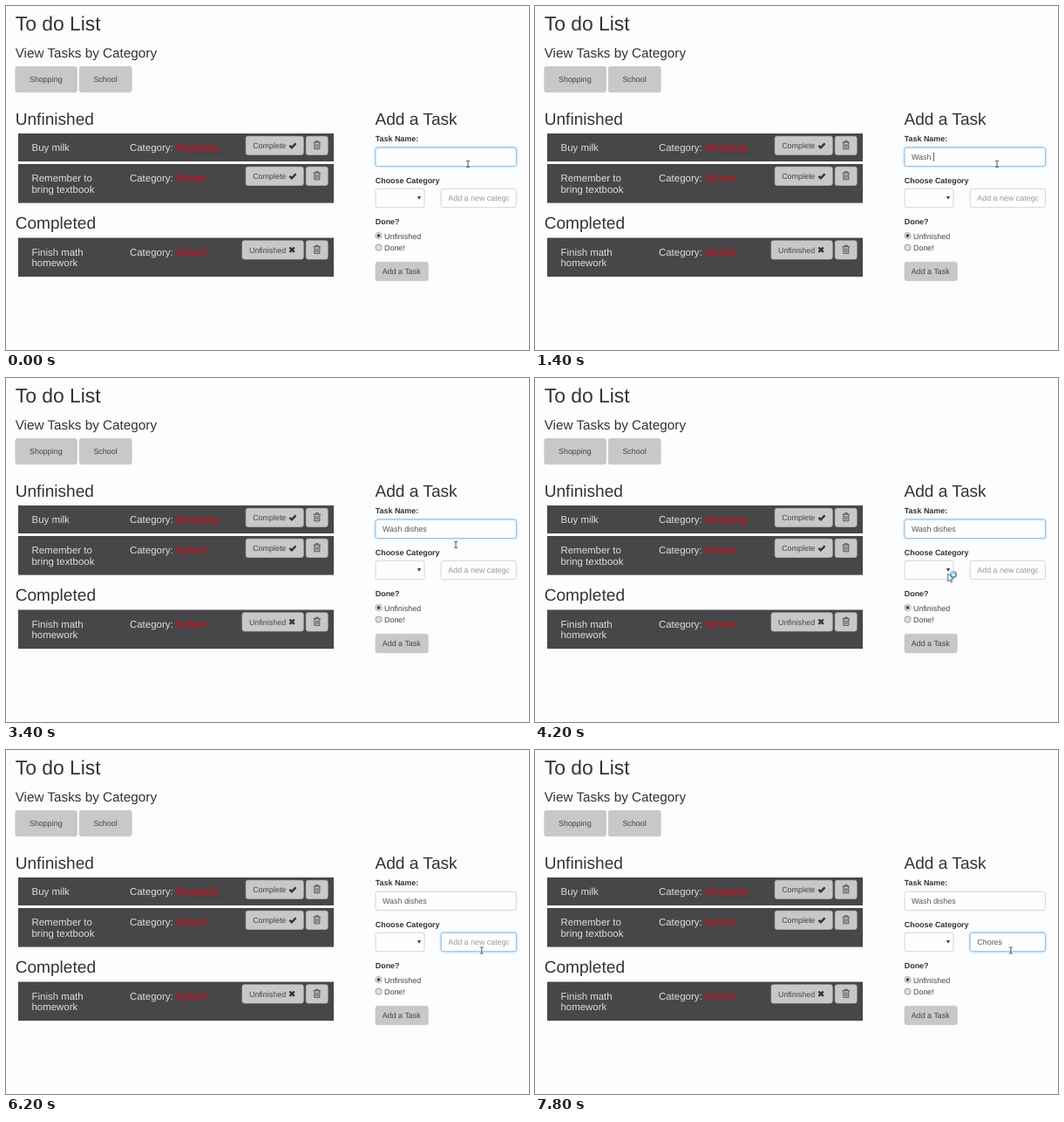
An HTML page for the animation above (8 s loop, 600 by 394 pixels).

```html
<!DOCTYPE html>
<html lang="en">
<head>
<meta charset="utf-8">
<title>To do List</title>
<style>
  html, body { margin: 0; width: 100%; height: 100%; overflow: hidden; background: #fdfcfe; }
  svg { display: block; width: 600px; height: 394px; }
  text { font: 8.91px "Liberation Sans", Arial, sans-serif; fill: #444; white-space: pre; text-rendering: geometricPrecision; }
  .h1 { font-size: 22.9px; fill: #333; }
  .h2 { font-size: 19.1px; fill: #333; }
  .h3 { font-size: 15.27px; fill: #333; }
  .label { font-weight: bold; fill: #333; }
  .item { font-size: 11.45px; fill: #dedddf; }
  .tag { font-size: 11.45px; fill: #dc0010; }
  .value { fill: #555; }
  .hint { fill: #999; }
  .card { fill: #474648; }
  .button { fill: #c8c7c9; stroke: #c1c0c2; stroke-width: .6; }
  .field { fill: #fefdff; stroke: #cbcacd; stroke-width: .8; }
  .field.focus { stroke: #72b3e6; filter: drop-shadow(0 0 1.6px rgba(102, 175, 233, .65)); }
</style>
</head>
<body>
<svg viewBox="0 0 600 394">
  <defs>
    <clipPath id="hintClip"><rect x="507" y="210" width="70.3" height="20"/></clipPath>
    <path id="check" d="M1.4 4.3 L3.8 6.7 L8.5 1.8" fill="none" stroke="#333" stroke-width="2.4"/>
    <path id="cross" d="M1.4 1.4 L6.8 6.8 M6.8 1.4 L1.4 6.8" fill="none" stroke="#333" stroke-width="2.4"/>
    <g id="trash" fill="none" stroke="#444" stroke-width=".9">
      <path d="M0 2 H8.4 M2.7 2 V.5 H5.7 V2 M1.2 2.2 V9.6 H7.2 V2.2 M3.2 3.8 V8.3 M5.2 3.8 V8.3"/>
    </g>
  </defs>
  <g id="page"></g>
  <rect id="caret" width=".8" height="10" fill="#333"/>
  <g id="pointer">
    <path id="beam" d="M-2 -3.7 Q0 -3.7 0 -2.7 Q0 -3.7 2 -3.7 M0 -3 V3 M-2 3.7 Q0 3.7 0 2.7 Q0 3.7 2 3.7" fill="none" stroke="#444" stroke-width=".9"/>
    <path id="arrow" d="M0 0 V8.9 L2 7 L3.4 10.2 L4.9 9.5 L3.5 6.5 L6.2 6.3 Z" fill="#fff" stroke="#444" stroke-width=".8"/>
    <g id="busy" transform="translate(6.3 1.2)" fill="none">
      <circle r="3.1" stroke="#5c9fcb" stroke-width="2.2"/>
      <path d="M-2.9 -1 A3.1 3.1 0 0 1 1 -2.9" stroke="#a5d3ec" stroke-width="1.6"/>
    </g>
  </g>
</svg>
<script>
const LOOP = 8000;
const $ = id => document.getElementById(id);
const page = $('page');

function add(tag, attrs, content = '') {
  const node = document.createElementNS('http://www.w3.org/2000/svg', tag);
  for (const key in attrs) node.setAttribute(key, attrs[key]);
  node.textContent = content;
  return page.appendChild(node);
}
const text = (x, y, content, cls = '') => add('text', { x, y, class: cls }, content);
const box = (x, y, width, height, cls, rx = 2.4) => add('rect', { x, y, width, height, rx, class: cls });
const icon = (name, x, y) => add('use', { href: '#' + name, x, y });

function button(x, y, width, height, label, pad) {
  box(x, y, width, height, 'button');
  text(x + pad, y + height / 2 + 3.1, label);
}

function card(y, height, lines, category, done) {
  box(14, y, 362, height, 'card', 0);
  lines.forEach((line, i) => text(29.5, y + 20 + i * 12.6, line, 'item'));
  text(142, y + 20, 'Category: ', 'item');
  text(194.8, y + 20, category, 'tag');
  const left = done ? 271 : 275.2;
  button(left, y + 3.3, 341.3 - left, 21.2, done ? 'Unfinished' : 'Complete', 8);
  icon(done ? 'cross' : 'check', 324, y + 9.6);
  box(344.2, y + 3.3, 25, 21.2, 'button');
  icon('trash', 352.6, y + 8.2);
}

function radio(y, label, checked) {
  add('circle', { cx: 427.5, cy: y, r: 3.6, fill: checked ? '#f5f5f6' : '#dddcde', stroke: '#8c8b8d', 'stroke-width': .8 });
  if (checked) add('circle', { cx: 427.5, cy: y, r: 1.9, fill: '#444' });
  text(434, y + 3.8, label);
}

text(10.7, 28.3, 'To do List', 'h1');
text(10.7, 59, 'View Tasks by Category', 'h3');
button(10.8, 69.3, 70.6, 29.5, 'Shopping', 16.2);
button(84.2, 69.3, 60, 29.5, 'School', 16.2);

text(10.7, 135.8, 'Unfinished', 'h2');
card(146, 32, ['Buy milk'], 'Shopping');
card(181, 44.6, ['Remember to', 'bring textbook'], 'School');
text(10.7, 255, 'Completed', 'h2');
card(265.5, 44.6, ['Finish math', 'homework'], 'School', true);

text(423.5, 135.8, 'Add a Task', 'h2');
text(423.8, 155.2, 'Task Name:', 'label');
text(423.8, 202.7, 'Choose Category', 'label');
const fields = {
  task: box(424, 162.2, 161.4, 21.4, 'field'),
  select: box(424, 209.3, 56, 21.4, 'field'),
  category: box(499.2, 209.3, 86.2, 21.4, 'field')
};
add('path', { d: 'M471.8 218 H476.2 L474 221.8 Z', fill: '#444' });
const values = {
  task: text(432, 175.9, '', 'value'),
  category: text(507.3, 223, '', 'value')
};
const hint = text(507.3, 223, 'Add a new category', 'hint');
hint.setAttribute('clip-path', 'url(#hintClip)');
text(423.8, 249.8, 'Done?', 'label');
radio(263, 'Unfinished', true);
radio(276.6, 'Done!', false);
button(424, 293.3, 60.3, 21.4, 'Add a Task', 7.8);

// Each track lists [start time, value]; values hold until the next step.
const tracks = {
  task: [[0, ''], [400, 'W'], [600, 'Wa'], [800, 'Was'], [1000, 'Wash'], [1400, 'Wash '], [1600, 'Wash d'],
    [1800, 'Wash di'], [2000, 'Wash dish'], [2200, 'Wash dishe'], [2600, 'Wash dishes']],
  category: [[0, ''], [6600, 'C'], [6800, 'Ch'], [7000, 'Cho'], [7200, 'Chore'], [7400, 'Chores']],
  focus: [[0, 'task'], [4400, 'select'], [6000, 'category']],
  caret: [[0, false], [200, true], [1200, false], [1400, true], [3200, false], [6000, true], [6200, false],
    [6600, true], [7800, false]],
  pointer: [[0, ['beam', 530, 181]], [3200, ['beam', 527, 183]], [3400, ['beam', 516, 191]],
    [3600, ['arrow', 502, 201]], [3800, ['arrow', 487, 213]], [4000, ['arrow', 477, 221]],
    [4200, ['busy', 473.7, 224]], [4400, ['arrow', 473.7, 224]], [5400, ['beam', 543.8, 234]],
    [5600, ['beam', 545, 231.5]], [5800, ['beam', 545.8, 229.5]]]
};
const at = (name, t) => tracks[name].findLast(([start]) => start <= t)[1];
const show = (node, on) => node.style.display = on ? '' : 'none';

function render(t) {
  for (const name in values) values[name].textContent = at(name, t);
  show(hint, !at('category', t));

  const focus = at('focus', t);
  for (const name in fields) fields[name].classList.toggle('focus', name === focus);

  const value = values[focus];
  const caretOn = at('caret', t) && value;
  show($('caret'), caretOn);
  if (caretOn) {
    const width = value.textContent ? value.getComputedTextLength() : 0;
    $('caret').setAttribute('x', +value.getAttribute('x') + width);
    $('caret').setAttribute('y', value.getAttribute('y') - 8);
  }

  const [kind, x, y] = at('pointer', t);
  $('pointer').setAttribute('transform', `translate(${x} ${y})`);
  show($('beam'), kind === 'beam');
  show($('arrow'), kind !== 'beam');
  show($('busy'), kind === 'busy');
}

const begin = performance.now();
function tick() {
  render((performance.now() - begin) % LOOP);
  requestAnimationFrame(tick);
}
tick();
</script>
</body>
</html>
```
